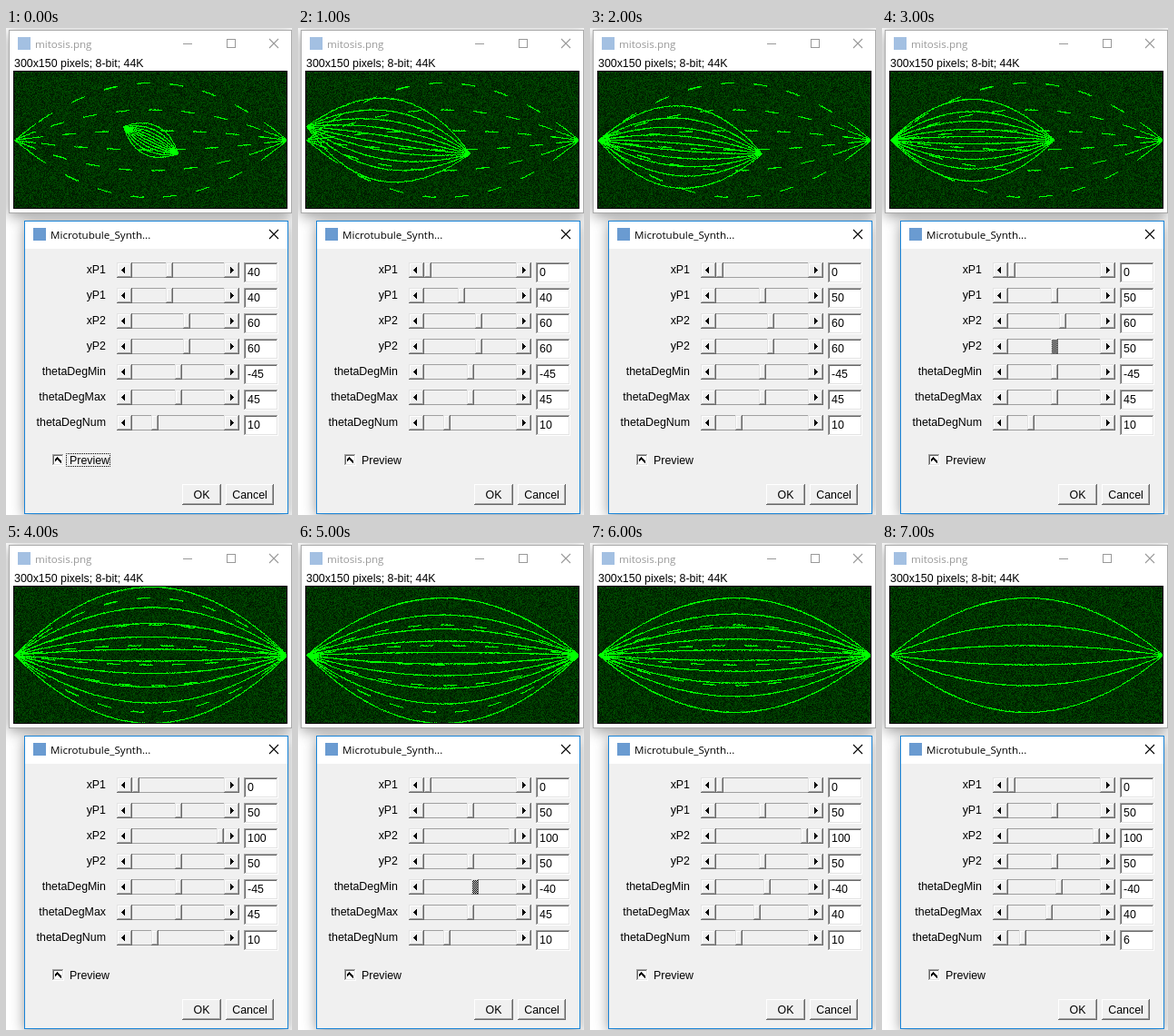
An HTML page with a canvas for the animation above (8 s loop, 315 by 536 pixels).

```html
<!DOCTYPE html>
<html lang="en">
<head>
<meta charset="utf-8">
<title>Microtubule preview</title>
<style>
html, body { margin: 0; width: 100%; height: 100%; overflow: hidden; background: #fff; }
canvas { display: block; }
</style>
</head>
<body>
<canvas id="stage" width="315" height="536"></canvas>
<script>
const ctx = document.getElementById('stage').getContext('2d');
const SANS = '12.4px "Liberation Sans", Arial, sans-serif';
const TITLE = '11.6px "Open Sans", sans-serif';
const STEP_MS = 1000;

const start = { xP1: 40, yP1: 40, xP2: 60, yP2: 60, thetaDegMin: -45, thetaDegMax: 45, thetaDegNum: 10 };
const edits = [{}, { xP1: 0 }, { yP1: 50 }, { yP2: 50 }, { xP2: 100 },
  { thetaDegMin: -40 }, { thetaDegMax: 40 }, { thetaDegNum: 6 }];
const blinking = { 3: 'yP2', 5: 'thetaDegMin' };
const stateAt = index => Object.assign({}, start, ...edits.slice(0, index + 1));
const finalState = stateAt(edits.length - 1);

// position of a value along its slider, 0 to 1
const fractions = {
  thetaDegMin: v => (v + 90) / 90,
  thetaDegMax: v => v / 90,
  thetaDegNum: v => (v - 1) / 40
};
const percent = v => v / 100;

function seeded(seed) {
  return () => {
    seed = (seed * 1664525 + 1013904223) >>> 0;
    return seed / 4294967296;
  };
}

function rect(color, x, y, w, h) {
  ctx.fillStyle = color;
  ctx.fillRect(x, y, w, h);
}

function text(string, x, y, font = SANS, color = '#000', align = 'left') {
  ctx.font = font;
  ctx.fillStyle = color;
  ctx.textAlign = align;
  ctx.fillText(string, x, y);
}

// nested one-pixel bevels: [top-left colour, bottom-right colour], outside in
function bevel(x, y, w, h, fill, ...rings) {
  for (const [light, dark] of rings) {
    rect(dark, x, y, w, h);
    rect(light, x, y, w - 1, h - 1);
    x++; y++; w -= 2; h -= 2;
  }
  rect(fill, x, y, w, h);
}
const button = (...box) => bevel(...box, '#f0f0f0', ['#fff', '#696969'], ['#f0f0f0', '#a0a0a0']);
const knob = (...box) => bevel(...box, '#f0f0f0', ['#e3e3e3', '#696969'], ['#fff', '#a0a0a0']);
const sunken = (...box) => bevel(...box, '#fff', ['#a0a0a0', '#fff'], ['#696969', '#e3e3e3']);

function cross(x, y, color) {
  ctx.strokeStyle = color;
  ctx.lineWidth = 1.1;
  ctx.beginPath();
  ctx.moveTo(x, y);
  ctx.lineTo(x + 10, y + 10);
  ctx.moveTo(x + 10, y);
  ctx.lineTo(x, y + 10);
  ctx.stroke();
}

function frame(border, x, y, w, h) {
  ctx.save();
  ctx.shadowColor = 'rgba(0,0,0,.4)';
  ctx.shadowBlur = 14;
  ctx.shadowOffsetY = 3;
  rect(border, x, y, w, h);
  ctx.restore();
  rect('#fff', x + 1, y + 1, w - 2, h - 2);
}

function drawNoise() {
  const image = ctx.createImageData(300, 150);
  const random = seeded(7);
  for (let i = 0; i < image.data.length; i += 4) {
    image.data[i + 1] = 20 + 60 * random();
    image.data[i + 3] = 255;
  }
  ctx.putImageData(image, 9, 48);
}

// parabolic arcs from P1 to P2 that leave the chord at evenly spaced angles
function drawFan(state, visible = () => true) {
  const { xP1, yP1, xP2, yP2, thetaDegMin, thetaDegMax, thetaDegNum } = state;
  const dx = (xP2 - xP1) * 3, dy = (yP2 - yP1) * 1.5;
  const dots = Math.ceil(Math.hypot(dx, dy) * 2);
  const random = seeded(thetaDegNum);
  ctx.fillStyle = '#0f0';
  for (let k = 0; k < thetaDegNum; k++) {
    const angle = thetaDegMin + (thetaDegMax - thetaDegMin) * k / (thetaDegNum - 1);
    const bend = Math.tan(angle * Math.PI / 180);
    for (let i = 0; i <= dots; i++) {
      const t = i / dots, bow = bend * t * (1 - t);
      const x = Math.round(9 + xP1 * 3 + dx * t - dy * bow);
      const y = Math.round(48 + yP1 * 1.5 + dy * t + dx * bow + (random() - .5) * .8);
      if (visible(x, k)) ctx.fillRect(x, y, 1, 1);
    }
  }
}

// faint earlier arcs: solid near the poles, dashed between
const isLeftover = (x, k) => Math.abs(x - 158) > 125 || (x + k * 23) % 36 < 15;

function drawImageWindow(state) {
  frame('#aaa', 3, 2, 312, 202);
  rect('#a3c0e2', 13, 10, 14, 14);
  text('mitosis.png', 32, 22, TITLE, '#999');
  rect('#999', 195, 17, 10, 1);
  ctx.strokeStyle = '#999';
  ctx.lineWidth = 1;
  ctx.strokeRect(243.5, 12.5, 9, 9);
  cross(290, 12, '#999');
  text('300x150 pixels; 8-bit; 44K', 9, 43);

  rect('#000', 8, 47, 302, 152);
  ctx.save();
  ctx.beginPath();
  ctx.rect(9, 48, 300, 150);
  ctx.clip();
  drawNoise();
  drawFan(finalState, isLeftover);
  drawFan(state);
  ctx.restore();
}

function drawArrow(tip, y, direction) {
  for (let i = 0; i < 4; i++) rect('#000', tip + i * direction, y - i, 1, 2 * i + 1);
}

function drawSlider(label, value, row, hatched) {
  const y = 258 + row * 28;
  text(label, 110, y + 12, SANS, '#000', 'right');
  rect('#a0a0a0', 122, y, 135, 17);
  rect('#f0f0f0', 139, y + 1, 101, 15);
  knob(122, y, 17, 17);
  knob(240, y, 17, 17);
  drawArrow(127, y + 8, 1);
  drawArrow(250, y + 8, -1);

  const fraction = (fractions[label] || percent)(value);
  const x = Math.round(139 + 93 * fraction);
  knob(x, y, 8, 17);
  if (hatched) {
    for (let i = 1; i < 7; i++)
      for (let j = 1; j < 16; j++)
        rect((i + j) % 2 ? '#000' : '#e0e0e0', x + i, y + j, 1, 1);
  }
  sunken(262, y, 38, 23);
  text(value, 266, y + 15);
}

function drawButton(label, x, w) {
  button(x, 502, w, 23);
  text(label, x + w / 2, 518, SANS, '#000', 'center');
}

function drawCheckbox(focused) {
  sunken(51, 469, 13, 13);
  for (let i = 0; i < 7; i++) rect('#000', 54 + i, 472 + Math.abs(i - 2), 1, 3);
  text('Preview', 70, 480);
  if (!focused) return;
  ctx.save();
  ctx.setLineDash([1, 1]);
  ctx.lineDashOffset = .5;
  ctx.strokeStyle = '#000';
  ctx.lineWidth = 1;
  ctx.strokeRect(66.5, 468.5, 48, 14);
  ctx.restore();
}

function drawDialog(state, blinkingLabel, focused) {
  frame('#1883d7', 20, 212, 291, 323);
  rect('#f0f0f0', 21, 243, 289, 291);
  rect('#6a9bd1', 30, 220, 14, 14);
  text('Microtubule_Synth...', 49, 232, TITLE);
  cross(290, 222, '#000');
  Object.entries(state).forEach(([label, value], row) =>
    drawSlider(label, value, row, label === blinkingLabel));
  drawCheckbox(focused);
  drawButton('OK', 194, 43);
  drawButton('Cancel', 242, 53);
}

let shown = -1;
function tick(now) {
  const index = Math.floor(now / STEP_MS) % edits.length;
  if (index !== shown) {
    shown = index;
    const state = stateAt(index);
    rect('#fff', 0, 0, 315, 536);
    drawImageWindow(state);
    drawDialog(state, blinking[index], index === 0);
  }
  requestAnimationFrame(tick);
}
tick(performance.now());
</script>
</body>
</html>
```
